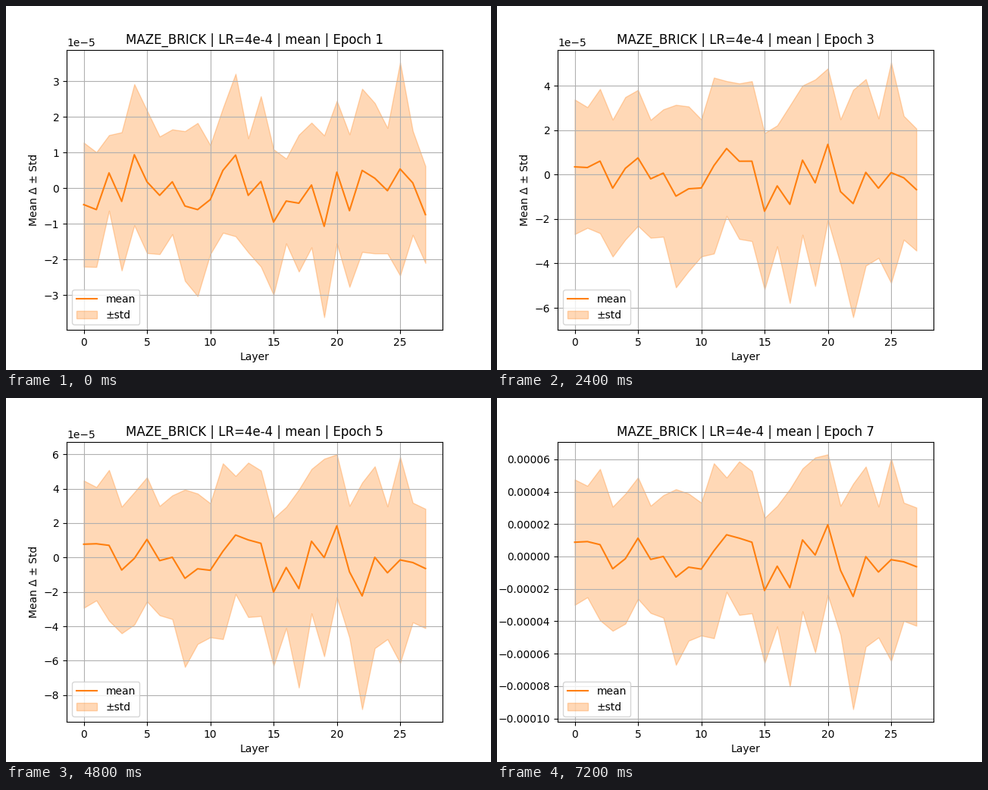
Animation of 640 by 480 pixels, one loop 8 s. Source, as a matplotlib script:

```python
import numpy as np
import matplotlib.pyplot as plt
from matplotlib.animation import FuncAnimation

TASK = "MAZE_BRICK"
COLOR = "tab:orange"
UNIT = 1e-5
EPOCHS = 7
TICKS = 20
TICK_MS = 400
TICKS_PER_EPOCH = 3
EASE_POWER = 2.3

# Per-layer profiles of the first and the last epoch; the rest are eased between.
MEAN_START = np.array([
    -.46, -.60, .43, -.37, .94, .18, -.20, .18, -.50, -.60, -.32, .50, .93, -.20,
    .19, -.95, -.36, -.42, .09, -1.07, .45, -.63, .50, .28, -.07, .54, .15, -.74])
MEAN_END = np.array([
    .88, .92, .73, -.76, -.14, 1.13, -.18, 0, -1.27, -.66, -.78, .35, 1.34, 1.13,
    .88, -2.10, -.60, -1.93, 1.02, .09, 1.96, -.85, -2.47, -.01, -.96, -.20, -.33, -.63])
STD_START = np.array([
    1.74, 1.61, 1.06, 1.94, 1.98, 2.00, 1.65, 1.47, 2.10, 2.43, 1.53, 1.75, 2.28, 1.60,
    2.39, 2.04, 1.19, 1.92, 1.75, 2.55, 2.00, 2.14, 2.29, 2.11, 1.76, 2.99, 1.46, 1.36])
STD_END = np.array([
    3.87, 3.44, 4.67, 3.83, 4.01, 3.75, 3.31, 3.78, 5.42, 4.54, 4.10, 5.40, 3.53, 4.74,
    4.39, 4.48, 3.72, 6.09, 4.41, 6.02, 4.34, 3.98, 6.96, 5.56, 4.04, 6.25, 3.65, 3.65])
LAYERS = np.arange(len(MEAN_START))

fig, ax = plt.subplots(figsize=(6.4, 4.8), dpi=100)


def ease_out(t):
    return 1 - (1 - t) ** EASE_POWER


def blend(start, end, amount):
    return (start + (end - start) * amount) * UNIT


def draw(tick):
    epoch = tick // TICKS_PER_EPOCH + 1
    progress = ease_out((epoch - 1) / (EPOCHS - 1))
    mean = blend(MEAN_START, MEAN_END, progress)
    std = blend(STD_START, STD_END, progress)

    ax.clear()
    ax.plot(LAYERS, mean, color=COLOR, label="mean")
    ax.fill_between(LAYERS, mean - std, mean + std, color=COLOR, alpha=0.3, label="±std")
    ax.set_title(f"{TASK} | LR=4e-4 | mean | Epoch {epoch}")
    ax.set_xlabel("Layer")
    ax.set_ylabel("Mean Δ ± Std")
    ax.grid(True)
    ax.legend(loc="upper right" if epoch == 2 else "lower left")
    return []


anim = FuncAnimation(fig, draw, frames=TICKS, init_func=lambda: draw(0),
                     interval=TICK_MS, repeat=True, repeat_delay=0)
plt.show()
```
